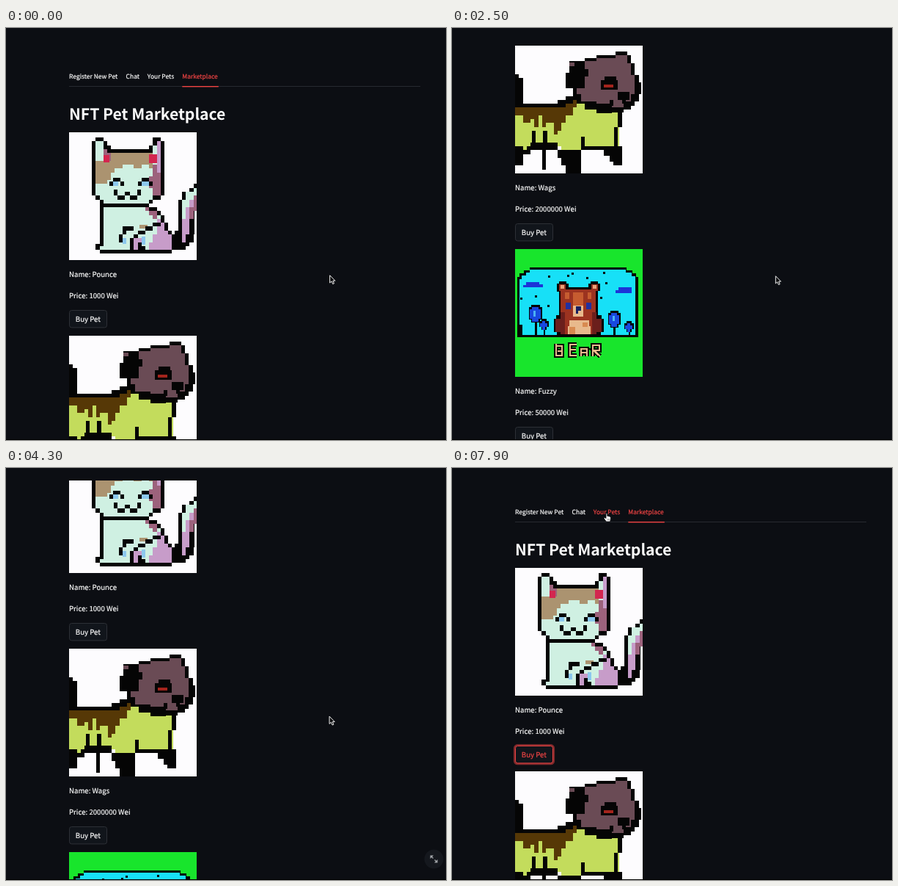
An HTML page that plays this animation: 600x561 px, repeating every 8000 ms.

```html
<!DOCTYPE html>
<html lang="en">
<head>
<meta charset="utf-8">
<title>Pet marketplace</title>
<style>
html, body { margin: 0; width: 100%; height: 100%; overflow: hidden; background: #0c0e13; }
svg { display: block; }
text { font: 9.67px "Noto Sans CJK JP", "Noto Sans CJK SC", "Noto Sans CJK", "Open Sans", sans-serif; color: #fafafa; fill: currentColor; stroke: currentColor; stroke-width: .2; text-rendering: geometricPrecision; }
text.tab { font-size: 8.48px; }
text.title { font-size: 21.2px; font-weight: 600; letter-spacing: -.003em; stroke: none; }
.box { fill: #11151b; stroke: #2d3036; }
.ring { fill: none; stroke: #f04444; stroke-opacity: .5; stroke-width: 2.6; display: none; }
.hot text, text.hot { color: #f04444; }
.hot .box { stroke: #f04444; }
.focus .ring { display: inline; }
.art { shape-rendering: crispEdges; }
</style>
</head>
<body>
<svg id="stage" width="600" height="561" viewBox="0 0 600 561">
  <clipPath id="view"><rect y="17" width="600" height="544"/></clipPath>
  <clipPath id="frame"><rect width="174" height="174"/></clipPath>
  <g clip-path="url(#view)"><g id="page"></g></g>
  <rect y="560" width="600" height="1" fill="#000"/>
  <g id="arrow">
    <path d="M0 0V10.2L2.4 8L4 11.8L5.8 11L4.2 7.4H7.2Z" fill="#0a0a0c" stroke="#f4f4f4" stroke-width="1"/>
  </g>
  <g id="hand">
    <path d="M-1 -5q1.2-1 1.8 .4V-1.6q1.3-.6 1.7 .4q1.2-.4 1.6 .5q1.3-.2 1.3 1.2V3L4.6 6H-.6L-3.6 2q-.8-1.4 .6-1.8L-1 1.6Z" fill="#fff" stroke="#0a0a0c" stroke-width=".8"/>
    <path d="M.8 2v2.4M2.4 2v2.4M4 2v2.4" stroke="#333" stroke-width=".5"/>
  </g>
</svg>
<script>
const NS = 'http://www.w3.org/2000/svg';
const LOOP = 8000, STEP = 100, CELL = 174 / 33, PITCH = 277;
const $ = id => document.getElementById(id);

function add(parent, tag, attrs = {}, label) {
  const node = document.createElementNS(NS, tag);
  for (const key in attrs) node.setAttribute(key, attrs[key]);
  if (label) node.textContent = label;
  return parent.appendChild(node);
}

const INK = '#050505', LILAC = '#c79cc9', MAUVE = '#9c627c', MINT = '#cff0e2', PAPER = '#fdfcfe';

const cat = [
  [INK, 'M34 12h-1.4v1h-1v1h-2v2h-1v8h-1v5h3v-1h1v-1h1v-2h.2v-6h1.2z'],
  [LILAC, 'M34 13h-1.4v1h-2v2h-1v11h1v-2h1v-7h1v-2h1.4z'],
  [MINT, 'M34 13h-1.4v1h-2v2h-1v5h1v-3h1v-2h2.4z'],
  [MAUVE, 'M32.6 15h1v4h-1v2h-1v-3h1z'],
  [INK, 'M8 17h13v1h2v1h1v1h1v2h1v2h1v1h1v4h-1v1h-19v-1h-1v-1.5h1z'],
  [MINT, 'M9 18h12v1h2v1h1v2h1v2h1v1h1v4h-18zM8 28h1v1h-1z'],
  [LILAC, 'M23 21h1v1h1v2h1v1h1v4h-6v-2h1v-2h1z'],
  [MAUVE, 'M20 18h1v1h2v2h-1v-1h-1v-1h-1z'],
  ['#ab9370', 'M18.5 22.5h2v1h-2z'],
  [LILAC, 'M16 26h3v3h-3z'],
  ['#8cc8ee', 'M14 26h1v1.4h-1zM19 25.6h1v2h-1z'],
  [INK, 'M22 22h2v1h-2v1h-2v1h-2v1h-1v2h-1v-2h1v-1h1v-1h2v-1h2zM14 23h3v1h-2v1h-1v2h-1v-2h1zM18 27h1v1h1v1h-2zM16 28h1v1h-1z'],
  [INK, 'M7 0h2v1h1v1h1v1h10v-1h1v-2h2v1h1v14h-1v1h-2v1h-1v1h-12v-1h-1v-1h-1v-1h-1v-14h1z'],
  [MINT, 'M7 1h2v2h1v1h12v-2h1v-1h1v14h-2v1h-1v1h-12v-1h-1v-1h-1z'],
  ['#ab9370', 'M9 4h13v4h-1v-1h-2v1h-2v-1h-3v1h-2v1h-1v2h-1v1h-3v-6h2z'],
  [MAUVE, 'M22 7h2v8h-2v-2h-1v-3h1zM9 3h1v1h1v2h-1v-1h-1z'],
  [LILAC, 'M23 1h1v8h-1z'],
  ['#d3264f', 'M9 4.6h1.5v1.8h-1.5zM21 4.4h2v2.2h-2z'],
  ['#8cc8ee', 'M11.5 11.4h1.4v1h-1.4zM19 11.4h2v1h-2z'],
  [INK, 'M10.5 11.4h1v-1h2v1h1v1h-1v-1h-2v1h-1zM18 11.4h1v-1h2v1h1v1h-1v-1h-2v1h-1z'],
  [INK, 'M11.7 13.5h1v1.5h2v-1h1.2v1h2v-1.5h1v1.5h-1v1h-2v-1h-1.2v1h-2v-1h-1z']
];

const dog = [
  ['#c3dc5c', 'M0 15h27v11h-10v2h-5v-2h-8v1h-4z'],
  ['#563806', 'M0 16h13v-2h3v2h-1v2h-2v2h-1v2h-1v1h-1v-3h-2v1h-1v-3h-1v3h-1v-2h-1v1h-2v-2h-2z'],
  [INK, 'M0 7.4h1v1h1v6.6h9v-1h2v-1h3v1h-1v1h-2v1h-13z'],
  [INK, 'M14 4h4v-.8h3v-.7h5v-1h3v1h1v2h1v3h1v2h.6v3h-.6v2h-1v1h-1v1h-2v.8h-3v.2h-4v-1h-3v-1.5h-2v-2h-1v-2h-2v-4h1z'],
  ['#6a4b55', 'M18 4h3v-.8h5v-.7h3v2h1v3h1v5h-1v2h-2v1.5h-3v-1h-4v-.5h-4v-2h-1v-1.5h2v-3h1v-2h-1zM14 4.4h1.4v1h-1.4z'],
  [INK, 'M22.2 9h1v-1h3v1h.4v2.4h-4.4zM26.6 12h3v2h-1v1h-1v-1h-1zM24.5 14h1v1.5h-1z'],
  ['#a3241c', 'M23 10h2.5v.8h-2.5z'],
  [INK, 'M26.6 17h1v4h-1v5h-1v-5h1zM23 26h4.7v5h-2.2v-1h-1v-1.5h-1.5zM17 23.6h1v2.4h8v1h-9z'],
  [INK, 'M11 27h6v6h-4v-2h-1v-2h-1zM4.3 22h1v3h-1zM7.3 22h1v3h-1z'],
  [INK, 'M0 26h2v1h1v-1h1v-1h7v2h1v1h-1v-1h-3v5h-1v-5h-3v1h-2v3h-2z']
];

const tree = (x, y, w, h) => `M${x} ${y}h${w}v3h3v${h}h-3v4h-${w}v-4h-3v-${h}h3z`;
const dots = [[45, 36], [77, 32], [97, 38], [120, 31], [71, 35], [27, 63], [123, 45], [116, 65], [130, 84], [44, 76], [7, 66], [60, 67]]
  .map(([x, y]) => `M${x} ${y}h3v3h-3z`).join('');
const bear = [
  [INK, 'M20 25H152v4h8v4h5v5h3V120H3V38h3v-5h6v-4h8z'],
  ['#17e0f7', 'M20 28H151v4h8v5h5V117H6V41h3v-5h6v-4h5z'],
  [INK, dots],
  ['#1c34d8', 'M15 45h18v3h5v4H11v-3h4zM141 52h18v8H137v-4h4z'],
  [INK, tree(22, 76, 12, 17) + tree(36, 95, 7, 8) + tree(130, 84, 11, 16) + tree(152, 98, 7, 8) + 'M27 98h3v20h-3zM39 108h2v10h-2zM134 106h3v12h-3zM155 110h2v8h-2zM6 103h4v14h-4z'],
  ['#1848e0', tree(23, 79, 9, 13) + tree(37, 98, 4, 5) + tree(131, 87, 8, 12) + tree(153, 101, 4, 5)],
  ['#4bb0f4', 'M25 84h3v8h-3zM133 91h3v7h-3z'],
  [INK, 'M57 47h3v-3h10v3h3v5h27v-5h3v-3h10v3h3v10h-3v33h5v5h3v18h-4v4H57v-4h-4V95h3v-5h4V58h-3z'],
  ['#9c3320', 'M60 48h9v7h35v-7h9v9h-3v59H62V57h-2z'],
  ['#6b1f1c', 'M55 95h7v18h-7zM111 95h7v18h-7zM62 86h6v30h-6zM105 86h6v30h-6z'],
  ['#e9a27a', 'M62 49h5v5h-5zM106 49h5v5h-5z'],
  ['#c65c30', 'M79 59h14v20h-14zM68 59h6v9h-6zM99 59h5v9h-5z'],
  ['#2230a0', 'M69 73h7v9h-7zM97 73h7v9h-7z'],
  ['#e8b98c', 'M79 77h14v15h-14zM74 97h27v8h2v11H72v-11h2z'],
  ['#d88a50', 'M74 106h8v10h-8zM92 100h7v6h-7z'],
  ['#182060', 'M83 78h7v6h-4v4h-3z'],
];
const word = 'M56 129v16h8v-6h-6h6v-7h-7M84 130h-9v15h9M76 137h7M90 146v-10h8v10M91 141h6M106 146v-15h9v7h-8l9 8';

function picture(parent, y, bg, shapes, fit) {
  const row = add(parent, 'g', { transform: `translate(86 ${y})` });
  const art = add(row, 'g', { class: 'art', 'clip-path': 'url(#frame)' });
  add(art, 'rect', { width: 174, height: 174, fill: bg });
  const inner = add(art, 'g', { transform: fit });
  for (const [fill, d] of shapes) add(inner, 'path', { fill, d });
  row.art = art;
  row.expand = add(row, 'g', { transform: 'translate(497.5 9.5)', opacity: 0 });
  add(row.expand, 'circle', { r: 13, fill: '#15181e' });
  add(row.expand, 'path', { d: 'M-1-1L-4-4M1 1L4 4', stroke: '#a4a7ab', 'stroke-width': 1.3 });
  add(row.expand, 'path', { d: 'M-5-5h4.5L-5-.5zM5 5H.5L5 .5z', fill: '#a4a7ab' });
  return row;
}

function details(parent, y, name, price) {
  add(parent, 'text', { x: 86, y: y + 20.7 }, 'Name: ' + name);
  add(parent, 'text', { x: 86, y: y + 49.2 }, `Price: ${price} Wei`);
  const button = add(parent, 'g');
  add(button, 'rect', { class: 'ring', x: 85.2, y: y + 64.9, width: 53.6, height: 25.6, rx: 4 });
  add(button, 'rect', { class: 'box', x: 86.5, y: y + 66, width: 51, height: 23.4, rx: 3 });
  add(button, 'text', { x: 94.8, y: y + 81 }, 'Buy Pet');
  return button;
}

const page = $('page');
add(page, 'rect', { x: 86, y: 79, width: 479, height: 1, fill: '#272a30' });
add(page, 'rect', { x: 240.3, y: 79, width: 49.5, height: 1.4, fill: '#f04444' });
const tabs = [['Register New Pet', 86], ['Chat', 163.6], ['Your Pets', 192.8], ['Marketplace', 240.3]]
  .map(([label, x]) => add(page, 'text', { class: 'tab', x, y: 68.8 }, label));
tabs[3].classList.add('hot');
add(page, 'text', { class: 'title', x: 86, y: 125.4 }, 'NFT Pet Marketplace');

const TOP = 142, INFO = 318.5;
const row1 = picture(page, TOP, PAPER, cat, `translate(0 7.2) scale(5.2 ${CELL})`);
const buy = details(page, INFO, 'Pounce', 1000);
const row2 = picture(page, TOP + PITCH, PAPER, dog, `scale(${CELL})`);
const alertBox = add(page, 'g');
add(alertBox, 'rect', { x: 86, y: 419, width: 479, height: 38, rx: 3, fill: '#193123' });
add(alertBox, 'text', { x: 97, y: 441.5, style: 'color:#dffde9' }, 'Pet purchased!');
const rest = add(page, 'g');
details(rest, INFO + PITCH, 'Wags', 2000000);
const row3 = picture(rest, TOP + 2 * PITCH, '#18e52c', bear, 'scale(1)');
for (const [stroke, width] of [[INK, 6], ['#e8b98c', 2.4]])
  add(row3.art, 'path', { d: word, fill: 'none', stroke, 'stroke-width': width });
details(rest, INFO + 2 * PITCH, 'Fuzzy', 50000);

// Each track row is a time followed by its values.
const scroll = [[0, 0], [200, 6], [900, 95], [1800, 165], [2600, 428], [3400, 428], [3600, 410], [4300, 173], [4500, 49], [6400, 49], [7000, 35], [7200, 6]];
const pointer = [[0, 441.6, 336.8], [1800, 441.6, 337.4], [3400, 441, 338.2], [4300, 441, 338.2], [4500, 415, 339], [5000, 113, 344], [5300, 113, 344], [5600, 287.4, 335.2], [7000, 287.4, 335.2], [7200, 262, 286], [7400, 120, 175], [7500, 64, 110], [7700, 150, 72], [7800, 211, 67], [7900, 211, 67]];
const fadeIn = [[5500, .33], [6300, 1]];
const stale = [[5900, 1], [6900, .33]];

function at(track, t) {
  const i = track.findIndex(k => k[0] > t);
  if (i < 0) return track[track.length - 1].slice(1);
  if (!i) return track[0].slice(1);
  const a = track[i - 1], b = track[i], p = (t - a[0]) / (b[0] - a[0]);
  return a.slice(1).map((v, n) => v + (b[n + 1] - v) * p);
}
const within = (t, from, to) => t >= from && t < to;
const show = (node, on) => { node.style.display = on ? '' : 'none'; };

function draw(time) {
  const t = Math.floor(time % LOOP / STEP) * STEP;
  const bought = within(t, 5500, 7300);
  const [x, y] = at(pointer, t);
  const hand = within(t, 5000, 5400) || t >= 7700;
  page.setAttribute('transform', `translate(0 ${-Math.round(at(scroll, t)[0])})`);
  rest.setAttribute('transform', `translate(0 ${bought ? -136 : 0})`);
  rest.setAttribute('opacity', bought ? at(stale, t)[0] : 1);
  alertBox.setAttribute('opacity', at(fadeIn, t)[0]);
  show(alertBox, bought);
  show(row2, !bought);
  buy.classList.toggle('hot', t >= 5000);
  buy.classList.toggle('focus', t >= 5300);
  tabs[2].classList.toggle('hot', t >= 7800);
  row3.expand.setAttribute('opacity', within(t, 2700, 4500) ? 1 : 0);
  row1.expand.setAttribute('opacity', within(t, 7200, 7500) ? 1 : 0);
  show($('hand'), hand);
  show($('arrow'), !hand);
  $(hand ? 'hand' : 'arrow').setAttribute('transform', `translate(${x} ${y})`);
}

const start = performance.now();
function tick() {
  draw(performance.now() - start);
  requestAnimationFrame(tick);
}
tick();
</script>
</body>
</html>
```
